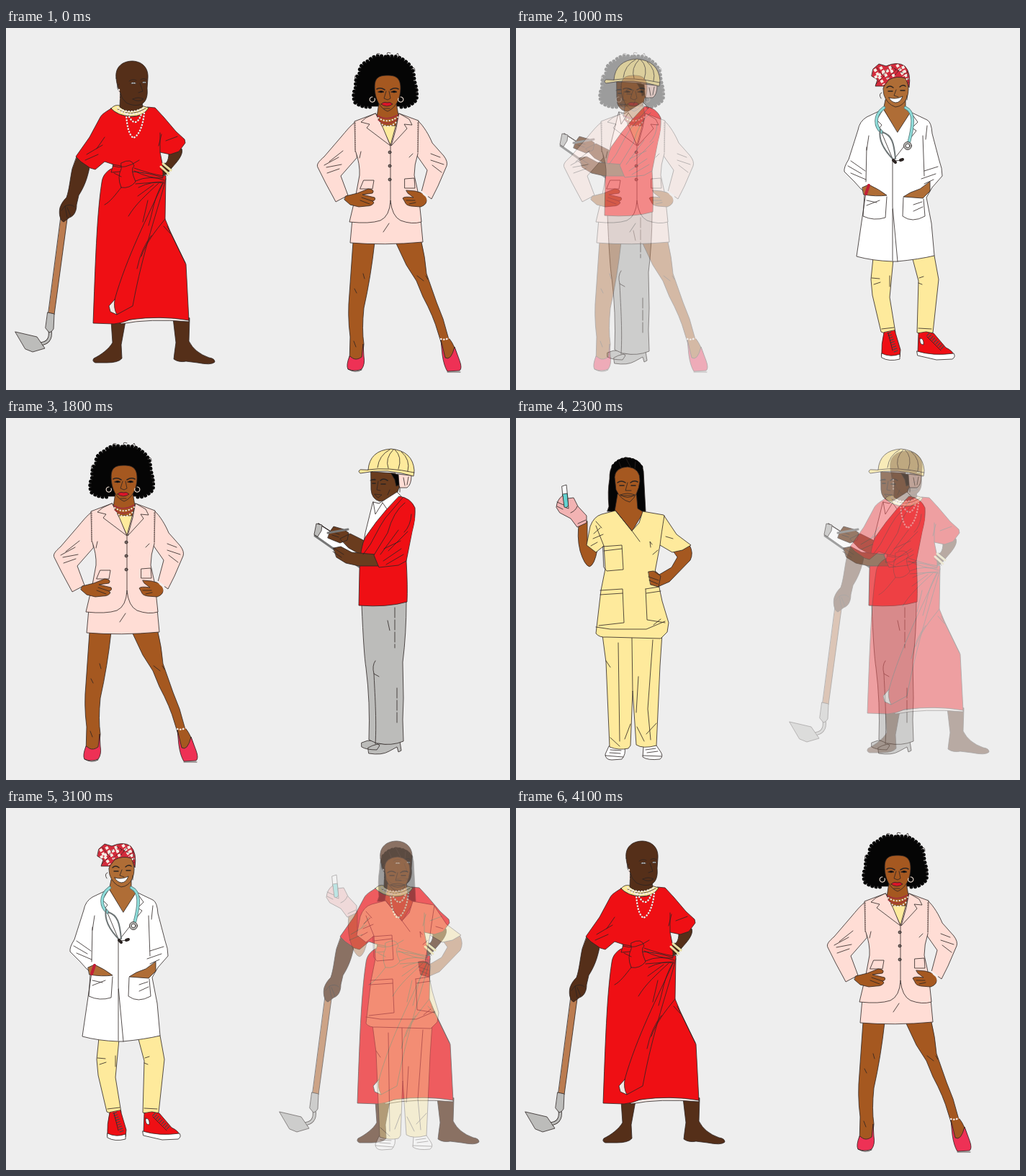
These frames come from a looping animation (700x504 px, 4200 ms). An HTML page:

```html
<!DOCTYPE html>
<html lang="en">
<head>
<meta charset="utf-8">
<title>Women at work</title>
<style>
html, body { margin: 0; width: 100%; height: 100%; overflow: hidden; background: #eee; }
svg { display: block; }
defs path, defs circle { stroke: #2b2422; stroke-width: .8; stroke-linejoin: round; stroke-linecap: round; }
defs .line { fill: none; }
defs .bold { fill: none; stroke-width: 2; }
defs .beads { fill: none; stroke: #f3e8e4; stroke-width: 2.4; stroke-dasharray: .5 3.6; }
.red { fill: #ef0f14; } .pink { fill: #ffddd5; } .yellow { fill: #feea9c; }
.white { fill: #fff; } .gray { fill: #bcbcba; } .black { fill: #050505; }
.rose { fill: #ee3155; } .wood { fill: #bb7c50; } .glove { fill: #f2b3b3; }
.deep { fill: #552f19; } .brown { fill: #6a3c1e; } .tan { fill: #a55820; } .light { fill: #af6d36; }
</style>
</head>
<body>
<svg id="stage" width="700" height="504" viewBox="0 0 700 504">
<defs>
<g id="farmer">
  <path class="wood" d="M78 250 87 251 67 399 59 397Z"/>
  <path class="line" style="stroke-width:5" d="M61 421C63 434 57 439 47 440"/>
  <path class="line" style="stroke:#bcbcba;stroke-width:3.4" d="M61 421C63 434 57 439 47 440"/>
  <path class="gray" d="M58 396 67 398 66 419Q63 424 60 424L55 418ZM13 423 43 430 54 446 37 451 27 447Z"/>
  <path class="deep" d="M146 408 148 438C143 447 132 455 122 460Q119 464 124 466L140 466Q156 466 161 460L160 441 166 408ZM232 404 236 438Q234 452 233 461Q240 466 250 464L266 466Q285 470 290 465Q290 460 282 459Q262 452 254 436L255 404Z"/>
  <path class="deep" d="M222 174 244 168C247 176 238 186 230 195L222 204 214 206 216 190C222 190 226 186 226 175ZM98 180 116 194C113 210 108 222 101 233L98 246C98 256 94 262 88 264L80 270C75 268 73 258 75 250C77 244 80 240 84 236C88 225 89 210 92 196Z"/>
  <path class="line" d="M77 254 82 248 85 264M85 250 90 262M82 248Q90 244 95 249"/>
  <path fill="#f4e8e4" d="M158 409Q200 398 254 406L254 409Q200 404 160 412Z"/>
  <path class="red" d="M146 196C139 200 134 206 133 215C126 260 124 330 121 411L150 412Q162 411 172 406Q215 400 254 407L250 329 228 283 221 266 222 206Z"/>
  <path class="red" d="M146 112C140 116 134 119 131 124L116 152 97 179 104 186 117 195 124 197 137 186 149 190 146 201Q180 196 218 208L218 193 214 173 228 176 240 172 249 160 248 155 236 144 219 124 207 111 196 110C193 120 182 124 172 123C160 122 152 118 146 112Z"/>
  <path class="yellow" d="M146 112Q151 106 158 108L188 108 198 111Q192 123 173 123Q155 122 146 112Z"/>
  <path class="deep" d="M159 82 158 110Q172 122 190 110L188 98Z"/>
  <path class="deep" d="M153 70C151 53 163 46 176 46C191 47 198 57 197 70L196 84C197 94 195 101 190 105C184 109 174 108 167 104L161 97C160 90 154 84 153 70Z"/>
  <path class="line" d="M171 74Q176 70 181 73M187 72Q191 69 195 72M186 77 190 88 184 90M176 99Q184 95 191 99Q184 104 176 99M157 78Q152 80 157 88"/>
  <path class="white" style="stroke-width:.6" d="M173 77Q177 74 181 77Q177 79 173 77ZM189 76Q192 73 195 76Q192 78 189 76Z"/>
  <path class="black" d="M177 75V78M192 74V77"/>
  <path class="line" d="M155 113Q173 125 194 112M167 120C168 140 172 150 177 153C184 150 190 138 192 118M169 120Q180 142 188 120"/>
  <path class="beads" d="M157 86V99M155 111Q173 122 193 110M157 115Q175 125 194 114M167 120C168 140 172 150 177 153C184 150 190 138 192 118M169 120Q180 142 188 120"/>
  <path class="red" d="M160 188Q175 180 178 192Q172 196 180 214Q172 224 160 222Q154 208 160 196Z"/>
  <path fill="#f4e8e4" d="M151 378 143 387 145 395 154 399Q149 390 151 378Z"/>
  <path class="line" d="M148 192Q165 198 185 184M148 190 160 192M178 195Q200 203 219 206M178 199Q200 210 218 209M180 213Q200 204 220 212M180 217 218 214M184 222Q204 212 219 216M222 210C212 250 190 310 176 387L154 399M160 222C152 232 145 242 137 246M219 214C198 260 167 320 151 378M217 217C205 238 205 252 198 275M212 216C195 232 180 245 170 262M205 218 183 234M221 266C207 283 194 300 188 318M228 286 219 276M224 276 249 327M214 173V146M212 164 216 148M112 176 134 163M110 184 128 176M126 168 137 152M222 157 238 151M150 202 160 207M202 289Q188 306 182 335M197 240 190 270"/>
  <path class="bold" style="stroke:#e9dfa2;stroke-width:3" d="M215 193 226 203M218 189 229 198"/>
  <path class="line" d="M214 196 224 205M217 191 227 200M220 188 230 196"/>
</g>
<g id="manager-hair">
  <path class="black" d="M527 41Q512 37 504 47Q491 51 492 63Q485 71 487 82Q481 94 486 104Q495 110 507 109L549 109Q560 110 569 100Q571 88 566 73Q566 55 554 47Q544 38 527 41Z"/>
  <path class="bold" style="stroke:#050505;stroke-width:5;stroke-dasharray:.1 5.3" d="M527 40Q512 36 503 46Q490 51 491 63Q484 71 486 82Q480 94 485 104Q495 111 507 110M549 110Q560 111 570 100Q572 88 567 73Q567 54 554 46Q544 37 527 40"/>
  <path class="line" d="M516 40Q512 34 519 36M530 39Q527 32 534 35M540 39 544 35 547 43M562 57Q568 52 568 60M568 83Q575 86 570 91M489 66Q483 63 485 72"/>
</g>
<g id="manager">
  <path class="tan" d="M518 104 515 124 525 142 540 142 545 122 542 104Z"/>
  <path class="tan" d="M512 82C512 69 518 66 530 66C542 66 548 70 548 84C548 98 541 112 530 116C519 112 512 98 512 82Z"/>
  <path class="bold" style="stroke-width:1.6" d="M515 85Q520 82 526 86M534 86Q540 82 545 85"/>
  <path class="black" d="M517 89Q521 86 525 89Q521 91 517 89ZM535 89Q539 86 543 89Q539 91 535 89Z"/>
  <path class="line" d="M528 88 525 98 530 100 534 98 532 88M525 112H533"/>
  <path fill="#dd1429" d="M521 106Q525 102 529 104Q533 102 537 106Q529 112 521 106Z"/>
  <path class="line" style="stroke:#e8d8cc;stroke-width:1.2" d="M509 96A3.6 3.6 0 1 0 512 98M548 96A3.6 3.6 0 1 1 545 98"/>
  <path class="tan" d="M482 298 477 370Q474 400 478 430L477 466Q485 476 494 470L497 440Q494 420 497 390Q507 345 512 298ZM541 298 556 330 570 352 579 374Q594 402 600 424L605 440 610 462 628 464Q626 445 614 430L607 405 598 382 584 342Q582 318 577 298Z"/>
  <path class="rose" d="M477 457Q472 470 475 475Q484 479 494 475Q499 468 497 457L496 440 494 458Q487 463 482 460ZM604 434 610 459Q618 464 623 444L630 463Q634 474 630 477L613 478Q608 470 606 455Z"/>
  <path class="line" d="M475 475Q485 481 494 476M613 479H631M496 342 498 349M484 363 487 369M571 345 580 352M583 345 586 350M483 436 486 444"/>
  <path class="beads" d="M604 433Q610 435 616 431"/>
  <path class="pink" d="M486 245 481 266 478 299Q525 303 579 298L576 266 572 245Z"/>
  <path class="pink" d="M486 130C478 136 472 144 466 151L442 179C434 186 431 190 433 194L444 216 458 242 475 233 465 206 487 181ZM572 129C580 136 588 150 592 160L608 178Q614 186 612 192L600 220 591 238 577 228 585 198 571 178Z"/>
  <path class="yellow" d="M521 136 543 136 535 165Z"/>
  <path class="pink" d="M513 119 484 130 485 170Q492 190 491 205L486 232 477 270Q505 273 520 268Q533 262 534 240Q536 262 548 268Q564 274 577 270L573 232 567 205Q567 190 572 175L573 129 546 119 534 163Z"/>
  <path class="pink" d="M513 119 500 125 493 131 505 134 501 139 534 164 524 140ZM546 119 560 127 564 135 553 134 557 140 535 164 542 139Z"/>
  <path style="fill:none;stroke:#eec6bd" d="M485 132V172M572 132V174"/>
  <path class="line" stroke-dasharray="1 2" d="M485 132V172M572 132V174"/>
  <path class="line" d="M534 164V240M442 191 462 180M445 194 466 190M449 186 468 171M446 202 463 196M590 184 608 190M592 191 605 201M590 175 603 180M497 212H511L509 224H492ZM554 210 567 209 568 223 554 223ZM532 272 524 284M493 172 491 181M560 180 565 175"/>
  <path class="line" style="stroke:#a3303c;stroke-width:1.5" d="M516 122Q529 130 544 121M517 128Q530 138 543 127"/>
  <path class="beads" style="stroke-width:2" d="M517 125Q530 134 544 124M519 132Q531 142 542 131"/>
  <g fill="#786a66"><circle cx="533" cy="173" r="2"/><circle cx="533" cy="192" r="2"/><circle cx="533" cy="211" r="2"/></g>
  <path class="tan" d="M472 234 488 230 503 224Q513 225 509 230L495 232 512 236Q514 240 509 241L511 243Q509 248 500 248L490 249 478 246 470 239ZM556 226 568 227 579 230 585 237Q585 246 576 249L563 248Q555 247 554 242L551 237Q553 234 566 236L558 230Z"/>
  <path class="line" d="M494 236 509 241M492 240 505 245M556 240 568 240M560 245 569 243"/>
  <path class="bold" style="stroke:#f5eeee;stroke-width:2.5" d="M580 231Q588 236 585 246M577 228 585 234"/>
</g>
<g id="doctor">
  <path class="yellow" d="M496 320 493 350 495 372 507 423Q517 428 527 424L519 375 524 322ZM551 322 559 352 557 424Q568 429 579 424L587 350 581 317Z"/>
  <path class="line" d="M494 348 505 349M497 357 506 354M559 355 564 357M560 348 566 346M508 419 525 417M559 418 577 419M519 345V360"/>
  <path class="red" d="M511 424Q507 440 508 457L533 458 534 448 526 421ZM559 425 558 452 585 460Q600 460 608 455Q606 449 597 445L580 425 570 423Z"/>
  <path class="white" d="M508 453Q520 459 533 454L533 461Q518 465 508 459ZM557 450Q580 457 608 453Q611 458 606 461L584 462 558 456ZM561 432Q567 432 566 441Q560 441 561 432Z"/>
  <path class="bold" style="stroke:#4a4645;stroke-width:6;stroke-dasharray:1.2 2.2;stroke-linecap:butt" d="M518 424 528 451M572 426 594 447"/>
  <path class="line" d="M517 425 523 449M571 430 590 449"/>
  <path class="light" d="M513 100 510 115 530 146 550 119 541 112 541 98Z"/>
  <path class="white" d="M510 113 487 124Q477 130 475 142L462 183Q455 194 456 200L470 214 479 224 486 229 480 270 473 318Q495 324 523 325L529 325Q560 322 581 317L577 272 570 236 578 222 592 206Q592 195 588 185L578 147Q577 131 571 128L548 117 530 145Z"/>
  <path class="line" d="M510 113 501 128 508 135 505 139 523 182V249L530 325M523 324V252M548 117 558 131 550 139 556 143 524 184M484 232 482 262Q497 269 513 264L515 235M538 236 537 262Q550 272 568 262L566 238M461 192 480 203M465 185 485 199M465 202 486 211M487 166 486 214M490 150 487 170M565 150 567 206M567 199 586 193M563 210 583 203M567 217 580 211M571 136 569 155M487 240 501 243M552 246 564 242M552 255 565 249M487 247 505 240"/>
  <path class="light" d="M481 222 490 218Q505 225 515 233Q500 235 483 232ZM575 214 575 227 565 237 538 235 548 229 561 224Z"/>
  <path class="bold" style="stroke:#c21f36;stroke-width:4" d="M490 219 486 231"/>
  <path class="bold" style="stroke:#55797a;stroke-width:4.6" d="M511 111C496 122 499 138 508 145M541 111C554 117 552 135 546 158"/>
  <path class="bold" style="stroke:#8edcd9;stroke-width:3" d="M511 111C496 122 499 138 508 145M541 111C554 117 552 135 546 158"/>
  <path class="bold" style="stroke:#6d7475" d="M506 141C503 155 511 170 525 184M509 145C522 149 525 160 527 182"/>
  <path class="bold" style="stroke-width:4" d="M524 184 527 187M534 184 537 183"/>
  <path class="line" d="M525 185 537 184"/>
  <circle class="gray" cx="544" cy="164" r="5.5"/><circle class="white" cx="544" cy="164" r="2.8"/>
  <path class="light" d="M510 84Q514 68 530 66 540 65 543 72Q547 86 543 97Q538 109 527 110Q515 106 511 93Z"/>
  <path fill="#d32b3b" d="M496 57 504 50 514 53Q530 46 540 53Q549 62 546 83L541 70Q529 66 518 72L511 81 499 81 502 72 494 67Z"/>
  <path class="bold" style="stroke:#f4ebe2;stroke-width:4;stroke-dasharray:4 2;stroke-linecap:butt" d="M498 57 511 79M506 54 517 71M519 53 525 68M529 51 539 67M498 69 521 57M537 53 544 72"/>
  <path class="line" stroke-dasharray="3 2" d="M501 55 509 66 516 57M512 66 500 78M521 54 540 64M526 66 535 55M516 70 528 58M543 60 545 76"/>
  <path class="bold" style="stroke-width:1.4" d="M515 83Q519 79 524 83M533 82Q537 78 541 81M517 88H523M534 87H540"/>
  <path class="line" d="M528 86 525 94 531 96M508 90Q503 92 507 98M543 94V100"/>
  <path class="white" d="M518 97Q528 100 537 95Q534 104 527 104Q521 103 518 97Z"/>
</g>
<g id="engineer">
  <path class="gray" d="M494 452Q502 448 510 449L519 456 515 462Q500 462 494 458ZM503 459Q515 452 528 454L547 450 549 463 545 465 543 458 532 464Q522 470 504 467Z"/>
  <path class="gray" d="M494 260Q497 330 500 348Q506 395 504 448L515 453 517 453Q535 457 552 450Q550 420 552 390L551 340Q556 300 556 256Z"/>
  <path class="line" d="M513 454C515 420 512 380 511 356Q508 345 513 338M511 356 518 360"/>
  <path class="line" stroke-dasharray="14 3" d="M530 282 533 296M543 376V426M540 264V320"/>
  <path class="white" d="M434 147 500 190 497 212 429 163Z"/>
  <path class="bold" style="stroke:#777;stroke-width:3" d="M429 164 496 211"/>
  <path class="bold" style="stroke-width:1.2" d="M434 147 497 188"/>
  <path class="gray" d="M428 162 431 147 439 149 438 157 433 165Z"/>
  <path class="brown" d="M464 168 478 161 500 172 496 192 476 181ZM450 158 455 151 469 155 476 160 474 170 464 174 454 170 447 167Z"/>
  <path class="line" d="M455 159 463 162M453 163 462 166"/>
  <path class="bold" style="stroke:#777;stroke-width:3" d="M447 160 475 155"/>
  <path class="brown" d="M507 75 541 77 547 94 543 105 528 114 519 116Q508 113 507 100Z"/>
  <path class="white" d="M510 117 518 119 543 103 549 109 530 136 500 200 494 190 499 160Z"/>
  <path class="line" d="M510 117 513 134 523 118M523 118 530 128"/>
  <path class="red" d="M546 109Q562 111 568 125Q569 140 564 158L556 199Q558 235 557 256Q530 264 490 261L491 210Q492 180 499 166L514 145 528 128Z"/>
  <path class="brown" d="M455 181 465 179 480 187 514 190 518 206 490 206 472 202 459 194Z"/>
  <path class="line" d="M455 181 469 190M454 186 466 194"/>
  <path class="red" d="M554 118Q535 130 530 160L511 191 518 208 545 205 557 190 568 140Z" style="stroke:none"/>
  <path class="line" d="M551 111 527 139 520 150 506 176 496 190M554 118Q538 130 530 160L511 191 518 208 545 205 556 199M545 156 520 190M558 158 531 185M549 182 524 199M548 171 525 182M552 190 528 204M563 134Q562 150 553 159"/>
  <path class="pink" d="M543 78 563 80Q563 93 557 97L547 97Z"/>
  <path class="black" d="M535 77 545 79 546 93 542 95 540 86Z"/>
  <path class="line" d="M543 94Q548 92 547 103M512 85 506 87M517 88 515 100 520 101M512 106 522 107 517 111ZM552 83 554 94M559 82 557 93M533 100 530 107"/>
  <path class="bold" style="stroke-width:1.6" d="M508 86 513 86M520 87Q524 83 530 87M509 91H513M521 92H527"/>
  <path class="yellow" d="M503 72Q505 45 535 43Q565 46 567 73L566 81Q550 76 530 74Q510 73 492 77Q488 74 492 72Z"/>
  <path class="line" d="M503 72Q530 68 567 76M516 69Q518 52 533 44M531 70Q526 56 538 44M545 71Q551 54 540 44M558 74Q562 58 549 47"/>
</g>
<g id="nurse">
  <path class="black" d="M518 123Q516 102 519 85Q518 58 543 55Q564 57 566 74L569 130 516 130Z"/>
  <path class="bold" style="stroke:#050505;stroke-width:5;stroke-dasharray:.1 5" d="M524 67Q532 57 543 57Q558 58 565 72"/>
  <path class="tan" d="M477 143Q473 165 478 185Q484 205 491 207Q498 205 502 183L488 174 488 144ZM608 186 630 177Q636 188 631 198L602 228 586 235 574 232 573 214 581 212 588 218 605 208 613 194Z"/>
  <path class="white" d="M453 95 459 93 462 122 456 127Z"/><path fill="#65d2d0" d="M454 106 460 105 462 122 456 127Z"/>
  <path class="glove" d="M445 124Q446 113 454 108L456 124 462 126 461 112 469 111 475 123 487 136 487 146 474 152 465 140 450 132Z"/>
  <path class="line" d="M446 117 455 121M446 123 454 127M474 123Q472 129 465 132M475 147 486 142"/>
  <path class="white" d="M518 457 513 468Q513 476 522 476L536 475Q542 468 540 459ZM566 458 565 472Q572 477 589 475Q594 471 590 465L584 456Z"/>
  <path class="line" d="M513 470 538 472M565 470 591 471M520 462 535 463M519 466 534 467M569 462 583 460M571 466 586 464"/>
  <path class="yellow" d="M509 302 514 340 519 458Q532 463 545 460L548 456 551 380 556 455Q565 461 584 456L589 345 592 300Z"/>
  <path class="line" d="M550 306 551 380M531 313 533 450M579 309 572 405 576 448M520 445 533 457M548 426 540 447M559 360 556 410M557 430 567 450M584 425 570 440M514 338 520 347"/>
  <path class="tan" d="M530 106 526 130 550 158 566 131 558 126 556 102Z"/>
  <path class="yellow" d="M527 129 508 134Q497 137 492 151L487 177 500 187 511 178 513 210 507 240 500 300Q505 306 515 305L590 307 599 298 601 285 592 255 588 236 582 214 589 177 606 187 620 184 632 177 612 162 594 135 565 130 560 146 550 157Z"/>
  <path class="tan" d="M573 214 580 213 590 220 587 235 576 232Z"/>
  <path class="line" d="M527 129 550 157 561 172M595 136Q591 160 589 177M511 178 500 150M500 291 520 294 570 294 596 283M510 179 536 177 538 211 515 213 511 208ZM506 240 537 238 539 285 504 289M569 238 588 235M569 238 571 281 596 285M511 185 536 182M506 246 537 244M570 244 590 241M497 161 506 153M496 168 510 162M500 144 508 153M493 178 502 173M576 180 575 172 578 176M579 190 586 184M573 221 587 226M574 226 586 231M580 288 590 280M607 168 597 165"/>
  <path class="tan" d="M526 82Q527 69 544 68Q562 70 561 88Q559 107 547 117Q534 114 528 100Z"/>
  <path class="line" d="M544 90 541 101 549 101M534 107Q544 103 554 107Q544 114 534 107ZM535 108H553M541 55 548 68M532 61 535 69M555 61 554 70"/>
  <path class="bold" style="stroke-width:1.5" d="M530 90Q535 86 541 90M548 90Q553 86 558 89M533 94H539M549 94H555"/>
</g>
</defs>
<g id="back"></g>
<g id="front"></g>
</svg>
<script>
const FRAME = 100, FRAMES = 42, FADE = [0.35, 0.7, 1];
// Horizontal shift of each figure at the left and the right place.
const SHIFT = {
  farmer: [0, 367], manager: [-366, 0], doctor: [-367, 0], engineer: [-367, 0], nurse: [-389, 0]
};
const places = [
  { order: ['farmer', 'engineer', 'manager', 'nurse', 'doctor'], starts: [2, 10, 19, 27, 35] },
  { order: ['manager', 'doctor', 'engineer', 'farmer', 'nurse'], starts: [6, 14, 23, 31, 39] }
];
const back = document.getElementById('back');
const front = document.getElementById('front');

function addPart(layer, id, x) {
  const use = document.createElementNS(layer.namespaceURI, 'use');
  use.setAttribute('href', '#' + id);
  use.setAttribute('x', x);
  layer.append(use);
  return use;
}

// Hair that lies behind everything goes to the back layer.
function addFigure(name, side) {
  const x = SHIFT[name][side];
  const parts = [addPart(front, name, x)];
  if (document.getElementById(name + '-hair')) parts.push(addPart(back, name + '-hair', x));
  return parts;
}

places.forEach((place, side) => {
  place.figures = place.order.map(name => addFigure(name, side));
});

function show({ figures, starts }, frame) {
  const count = figures.length;
  const done = starts.filter(start => start <= frame).length;
  const current = done % count;
  const mix = done ? FADE[Math.min(frame - starts[done - 1], 2)] : 1;
  const previous = (current + count - 1) % count;
  figures.forEach((parts, i) => {
    const opacity = i === current ? mix : i === previous ? 1 - mix : 0;
    for (const part of parts) {
      part.style.opacity = opacity;
      part.style.display = opacity ? '' : 'none';
    }
  });
}

function draw() {
  const frame = Math.floor(performance.now() / FRAME) % FRAMES;
  places.forEach(place => show(place, frame));
  requestAnimationFrame(draw);
}
draw();
</script>
</body>
</html>
```
